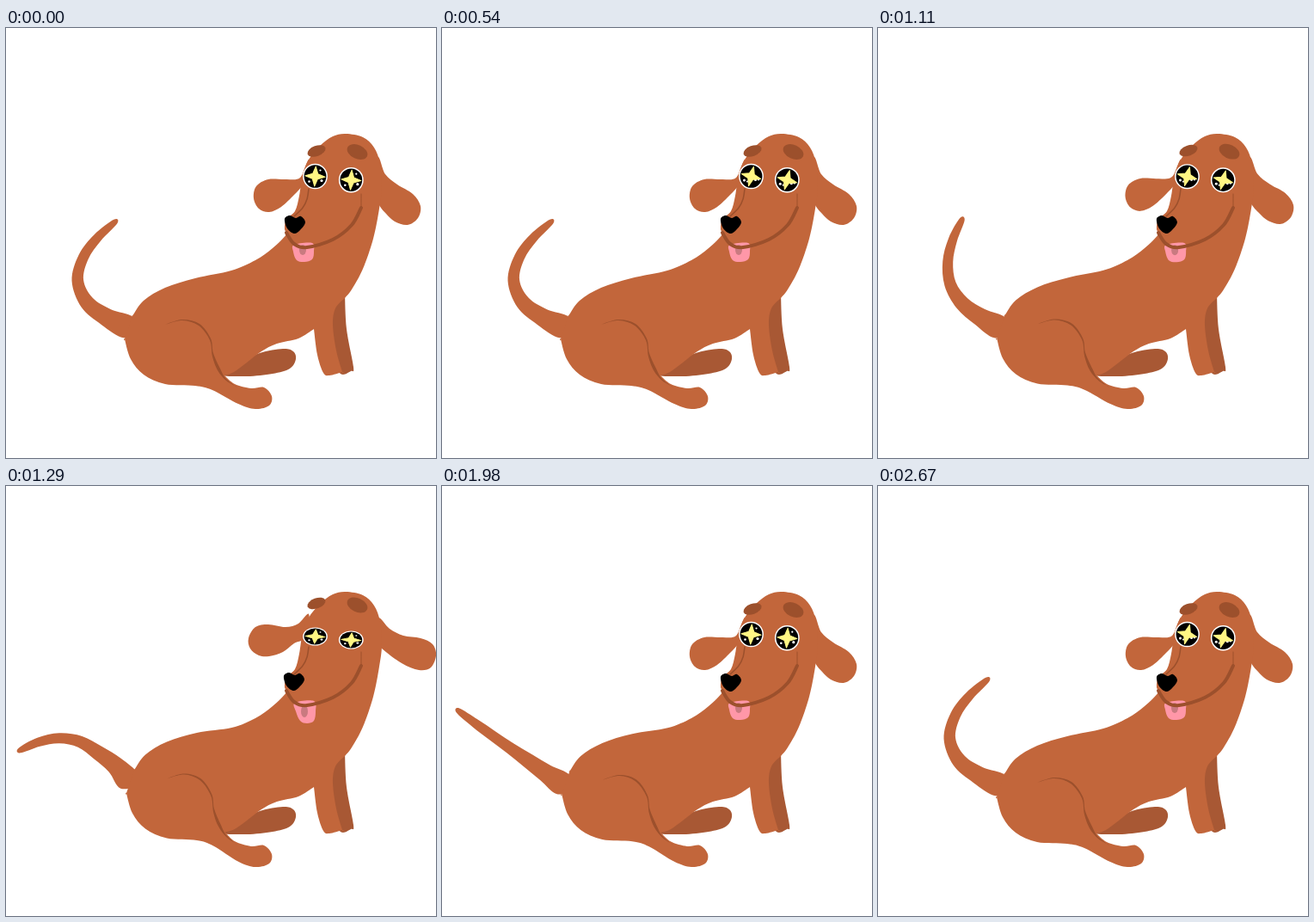
Write an HTML page with a canvas that moves like this. It is 500x500 px and loops after 2700 ms.

```html
<!DOCTYPE html>
<html>
<head>
<meta charset="utf-8">
<title>Happy dog</title>
<style>
  html, body { margin: 0; width: 100%; height: 100%; overflow: hidden; background: #fff; }
  canvas { display: block; }
</style>
</head>
<body>
<canvas id="stage" width="500" height="500"></canvas>
<script>
const ctx = document.getElementById('stage').getContext('2d');
const FUR = '#c2663b', SHADE = '#a85834', LINE = '#9c502c';
const LOOP = 2700, WAG = 540, TWINKLE = 300;
const RAD = Math.PI / 180;
const clamp = (v, a = 0, b = 1) => Math.min(b, Math.max(a, v));
const mix = (a, b, k) => a + (b - a) * k;
const mixAll = (a, b, k) => a.map((v, i) => mix(v, b[i], k));

const points = text => text.trim().split(/\s+/).map(p => p.split(',').map(Number));

// Repeated points make corners.
const BODY = points(`395,123 415,127 428,139 435,158 437,185 434,210 427,245 415,280 402,304 394,314 394,314
  383,326 380,345 384,375 391,400 391,400 376,404 369,401 362,380 358,350 358,350 340,361 315,367 297,376
  280,389 265,400 254,404 254,404 266,414 285,419 300,418 309,428 306,439 290,443 270,437 240,421 220,416
  185,414 160,403 145,385 138,362 138,362 147,335 147,335 160,317 185,302 220,291 262,282 290,270 310,256 326,240
  324,234 326,222 336,213 341,195 345,170 352,153 365,137 380,126`);
const HIND_LEG = points('250,403 270,390 295,378 322,373 334,376 337,385 330,396 310,402 280,405');
const FORE_LEG = points('394,309 394,309 396,350 404,394 401,399 388,401 378,370 376,330');
const THIGH = points('185,345 205,340 224,346 237,363 240,382 246,398 256,410 268,417');
const THIGH_EDGE = points('266,416 255,407 249,396 241,378 238,361 225,344 205,339');
const LIP = points('326,238 335,251 350,255 380,246 402,229 413,209 413,193');
const CHEEK = points('352,187 350,199 345,209 335,219');
const NOSE = points('324,222 330,218 337,221 343,219 348,226 342,235 335,239 327,233');
const LEFT_EAR = [
  points('352,153 342,174 325,176 305,176 291,184 288,198 294,210 306,214 320,208 335,194 346,182 356,168'),
  points('352,149 340,160 325,164 305,161 290,164 282,177 284,189 294,197 306,198 322,193 335,183 350,175')
];
const RIGHT_EAR = [
  points('432,150 441,170 455,182 473,193 482,207 479,221 467,229 452,225 442,216 434,206 424,185'),
  points('432,153 446,166 462,174 482,177 496,184 500,197 494,211 480,214 460,206 437,189 424,175')
];
const TONGUE = [
  points('335,252 334,260 338,270 347,272 356,269 358,260 356,250'),
  points('336,252 337,262 342,273 350,276 358,273 360,262 358,250')
];

// Tail poses: root x, root y, segment length, then segment directions in degrees.
const TAIL = [
  [142, 348, 28, 205, 217, 247, 284, 306, 318],
  [141, 349, 23.5, 214, 218, 225, 234, 248, 260],
  [141, 347, 25, 213, 215, 215, 215, 215, 216],
  [143, 343, 24.5, 226, 216, 212, 192, 174, 162]
];
const TAIL_HALF = [13.5, 10.5, 8.5, 6.8, 6, 5.2, 3];
const WAG_KEYS = [[-30, 0], [0, 0], [60, 1], [125, 2], [210, 3.1], [255, 3.2],
  [300, 3], [360, 2], [435, 1], [510, 0], [540, 0], [600, 1]];

// Cubic interpolation through timed keys.
function along(keys, t) {
  const i = keys.findIndex(k => k[0] > t) - 1;
  const [a, b, c, d] = [keys[Math.max(0, i - 1)], keys[i], keys[i + 1], keys[Math.min(i + 2, keys.length - 1)]];
  const h = c[0] - b[0], s = (t - b[0]) / h;
  const flat = b[1] === c[1];
  const m0 = flat || b[1] === 0 ? 0 : (c[1] - a[1]) / (c[0] - a[0]) * h;
  const m1 = flat || c[1] === 0 ? 0 : (d[1] - b[1]) / (d[0] - b[0]) * h;
  const s2 = s * s, s3 = s2 * s;
  return (2 * s3 - 3 * s2 + 1) * b[1] + (s3 - 2 * s2 + s) * m0 + (3 * s2 - 2 * s3) * c[1] + (s3 - s2) * m1;
}

function trace(pts, closed) {
  const n = pts.length;
  const at = i => pts[closed ? (i + n) % n : clamp(i, 0, n - 1)];
  ctx.beginPath();
  ctx.moveTo(...pts[0]);
  for (let i = 0; i < (closed ? n : n - 1); i++) {
    const [a, b, c, d] = [at(i - 1), at(i), at(i + 1), at(i + 2)];
    ctx.bezierCurveTo(b[0] + (c[0] - a[0]) / 6, b[1] + (c[1] - a[1]) / 6,
      c[0] - (d[0] - b[0]) / 6, c[1] - (d[1] - b[1]) / 6, c[0], c[1]);
  }
}

function blob(pts, color) {
  trace(pts, true);
  ctx.fillStyle = color;
  ctx.fill();
}

function line(pts, width) {
  trace(pts, false);
  ctx.strokeStyle = LINE;
  ctx.lineWidth = width;
  ctx.lineCap = 'round';
  ctx.stroke();
}

function oval(x, y, rx, ry, color, angle = 0) {
  ctx.beginPath();
  ctx.ellipse(x, y, rx, ry, angle * RAD, 0, 2 * Math.PI);
  ctx.fillStyle = color;
  ctx.fill();
}

const morph = ([a, b], k) => a.map((p, i) => mixAll(p, b[i], k));

function drawTail(swing) {
  const i = Math.min(2, Math.floor(swing));
  const [x, y, step, ...dirs] = mixAll(TAIL[i], TAIL[i + 1], swing - i);
  const left = [], right = [];
  let px = x, py = y;
  TAIL_HALF.forEach((half, j) => {
    const before = dirs[Math.max(0, j - 1)], after = dirs[Math.min(j, 5)];
    const a = (before + after) / 2 * RAD;
    left.push([px + half * Math.sin(a), py - half * Math.cos(a)]);
    right.unshift([px - half * Math.sin(a), py + half * Math.cos(a)]);
    px += step * Math.cos(after * RAD);
    py += step * Math.sin(after * RAD);
  });
  blob([[x + 12, y + 4], ...left, ...right], FUR);
}

function drawEye(x, y, squash, tilted) {
  ctx.save();
  ctx.translate(x, y);
  ctx.scale(1, squash);
  oval(0, 0, 14.4, 14.8, '#fff');
  oval(0, 0, 12.9, 13.3, '#000');
  const dots = tilted ? [[-8, 4.5, 1.5], [-4.5, 6, 1.1], [5, 4, 1.5], [8.5, 3.5, 1.4]]
                      : [[-7, 6, 1.3], [7.5, 5, 1.6], [6, -7, 1.1]];
  for (const [dx, dy, r] of dots) oval(dx, dy, r, r, '#fff');
  ctx.rotate((tilted ? 15 : 4) * RAD);
  ctx.beginPath();
  for (let i = 0; i < 8; i++) {
    const r = i % 2 ? 4.3 : 11.5, a = i * Math.PI / 4;
    ctx.lineTo(r * Math.sin(a), -r * Math.cos(a));
  }
  ctx.closePath();
  ctx.fillStyle = ctx.strokeStyle = '#fff684';
  ctx.lineWidth = 1;
  ctx.lineJoin = 'round';
  ctx.fill();
  ctx.stroke();
  ctx.restore();
}

function draw(t) {
  const swing = along(WAG_KEYS, t % WAG);
  const lift = 1.17 * Math.sin(Math.PI * clamp((t - 1065) / 600)) ** 2;
  const tilted = t % TWINKLE >= 210;
  const bob = clamp(swing / 3);
  const hips = pts => pts.map(([x, y]) => {
    const k = bob * clamp((275 - x) / 60);
    return [x + 2 * k, y - 4.5 * k];
  });

  ctx.fillStyle = '#fff';
  ctx.fillRect(0, 0, 500, 500);
  blob(HIND_LEG, SHADE);
  blob(FORE_LEG, SHADE);
  drawTail(swing);
  blob(morph(LEFT_EAR, lift), FUR);
  blob(morph(RIGHT_EAR, lift), FUR);
  blob(hips(BODY), FUR);
  blob(hips([...THIGH, ...THIGH_EDGE]), LINE);

  const tongue = morph(TONGUE, lift);
  blob(tongue, '#ff97a8');
  oval(mix(345, 347, lift), mix(258, 262, lift), 4, mix(6, 7, lift), '#c97a80');
  line(LIP.slice(0, 6), 4);
  line(LIP.slice(5), 1);
  line(CHEEK, 1.5);
  blob(NOSE.map(([x, y]) => [x - lift, y - lift]), '#000');

  oval(361, mix(143, 136.5, lift), 11, 6, LINE, -20);
  oval(408.5, mix(144, 138.5, lift), 12.5, 8, LINE, 25);
  const squash = 1 - 0.29 * lift;
  drawEye(359.5, mix(172.5, 175, lift), squash, tilted);
  drawEye(401.3, mix(176.7, 179, lift), squash, tilted);
}

function frame() {
  draw(performance.now() % LOOP);
  requestAnimationFrame(frame);
}
frame();
</script>
</body>
</html>
```
